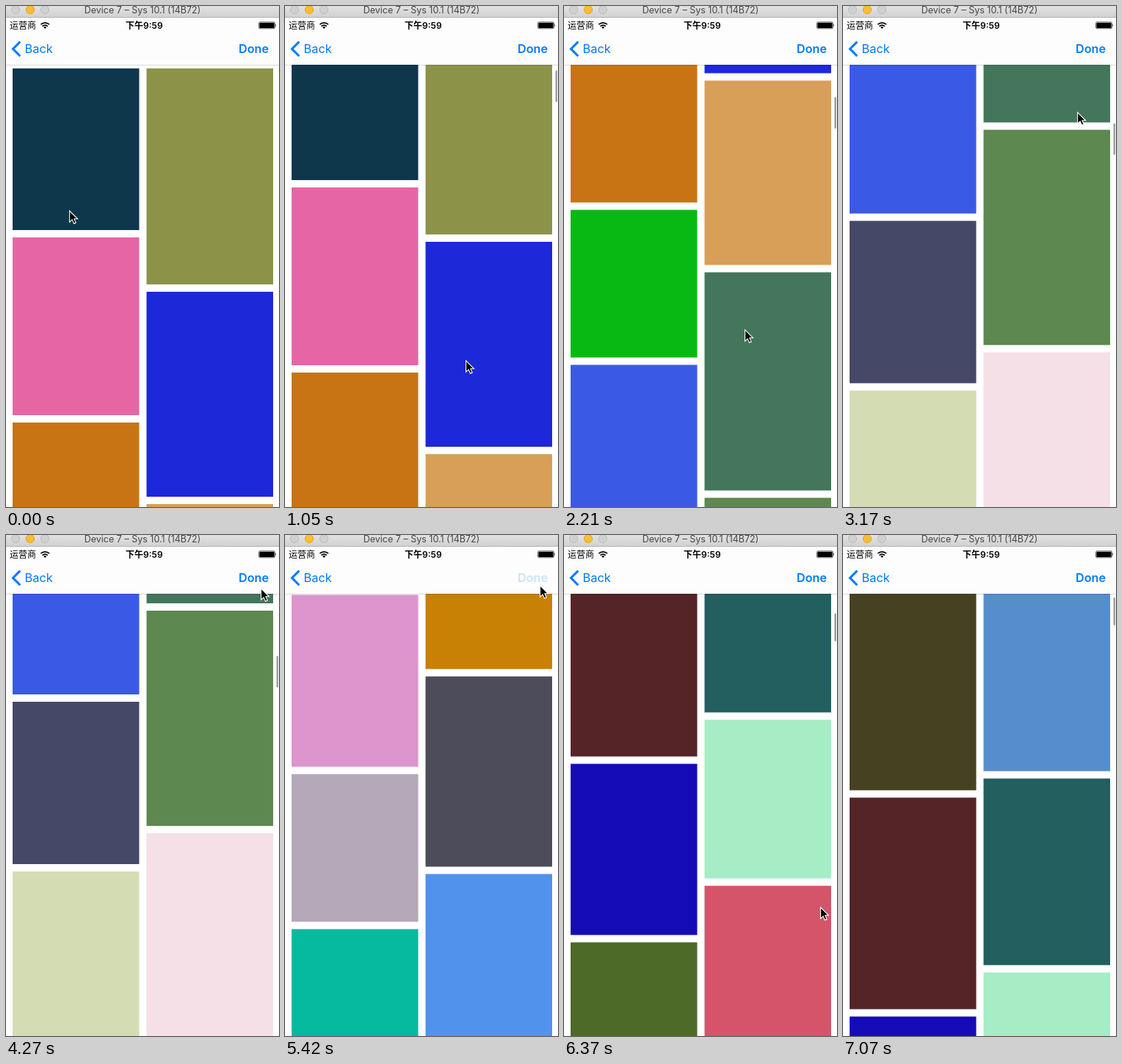
Animation, 372 px wide and 682 px high, one loop 7.17 s. Source, as an HTML page:

```html
<!DOCTYPE html>
<html lang="zh">
<head>
<meta charset="utf-8">
<style>
  html, body { margin: 0; width: 372px; height: 682px; overflow: hidden; background: #fff; }
  svg { display: block; }
  text { font-family: Inter, "Noto Sans CJK SC", "Noto Sans CJK", sans-serif; }
</style>
</head>
<body>
<svg width="372" height="682" viewBox="0 0 372 682">
  <defs>
    <linearGradient id="titleBar" x2="0" y2="1">
      <stop stop-color="#e2e2e2"/><stop offset="1" stop-color="#d1d1d1"/>
    </linearGradient>
    <clipPath id="view"><rect y="80" width="372" height="602"/></clipPath>
  </defs>

  <g clip-path="url(#view)"><g id="tiles"></g></g>
  <rect id="indicator" x="368.5" width="2.5" rx="1.25" fill="#000" fill-opacity=".38"/>

  <rect y="16" width="372" height="64" fill="#fdfdfd"/>
  <rect y="80" width="372" height=".5" fill="#000" fill-opacity=".3"/>
  <rect width="372" height="15" fill="url(#titleBar)"/>
  <rect y="15" width="372" height="1" fill="#b4b4b4"/>
  <g fill="#d0d0d0" stroke="#bcbcbc">
    <circle cx="13" cy="5" r="5.6"/>
    <circle cx="33" cy="5" r="5.6" fill="#fdbe2f" stroke="#e3a22a"/>
    <circle cx="53" cy="5" r="5.6"/>
  </g>
  <text x="186" y="9.8" font-size="12.5" fill="#454545" text-anchor="middle">Device 7 – Sys 10.1 (14B72)</text>

  <text x="5" y="30.5" font-size="12">运营商</text>
  <g fill="none" stroke="#000" stroke-width="1.7">
    <path d="M47.4 25.2a8.2 8.2 0 0 1 11.6 0M49.6 27.6a5 5 0 0 1 7.2 0"/>
    <path d="M53.2 31l-2-2.1a2.9 2.9 0 0 1 4 0z" fill="#000" stroke="none"/>
  </g>
  <text x="188.3" y="30.5" font-size="12" font-weight="600" text-anchor="middle">下午9:59</text>
  <rect x="344.5" y="21.8" width="22" height="9" rx="1.8" fill="none" stroke="#000" stroke-width=".6"/>
  <rect x="345.4" y="22.7" width="20.2" height="7.2" rx="1"/>
  <path d="M367.4 24.6q1.4 1.7 0 3.4z"/>

  <g fill="#007aff">
    <path d="M19.3 48.6L9.5 58.4L19.3 68.2" fill="none" stroke="#007aff" stroke-width="3"/>
    <text x="25.5" y="64" font-size="16.4">Back</text>
    <text id="done" x="358" y="64" font-size="16.2" font-weight="600" text-anchor="end">Done</text>
  </g>
  <path id="cursor" d="M.6 .8V16.2L4.1 12.9L6.5 18.3L9.2 17.1L6.9 11.8H11.6Z" stroke="#fff" stroke-width="1.1"/>
</svg>

<script>
const LOOP = 7170, TOP = 85, GAP = 10, COLUMN_X = [9, 191.5], COLUMN_W = 172.5, VIEW_H = 603;

// Each list: time it appears, content height, two columns of [colour, height].
const lists = [
  { from: 0, total: 8456, columns: [
    [["#0f374c", 220], ["#e666a5", 242], ["#c87414", 277], ["#08b914", 201], ["#3a5ae6", 295], ["#464868", 221], ["#d4dcb4", 260]],
    [["#8c9349", 294], ["#1d28d8", 279], ["#d79f58", 251], ["#44765c", 297], ["#5d884f", 293], ["#f5e0e7", 300]]] },
  { from: 4630, total: 9000, columns: [
    [["#9c7f5a", 1210], ["#4a8f9c", 240], ["#a65f86", 290]],
    [["#6d8fc0", 1330], ["#8f9a60", 250], ["#7b6aa8", 260]]] },
  { from: 5420, total: 9568, columns: [
    [["#464221", 296], ["#552427", 288], ["#150cb8", 233], ["#4d6a29", 289], ["#dd95cd", 234], ["#b5a8b9", 201], ["#05ba9f", 260]],
    [["#568ecc", 270], ["#225f5e", 254], ["#a6ecc4", 216], ["#d5546a", 230], ["#c88005", 237], ["#4d4c5b", 259], ["#5092ec", 290]]] }
];

const cadence = [[0, 1], [60, 3], [270, 1], [450, 11], [1130, 1], [1220, 5], [1590, 4], [1950, 3],
  [2210, 6], [2730, 5], [3170, 4], [3500, 9], [4270, 5], [4630, 1], [4770, 4], [5000, 1], [5300, 1],
  [5420, 1], [5560, 9], [6190, 1], [6280, 1], [6370, 8], [7070, 1], [LOOP, 1]];

// Tracks: [time, value, ...], linear between keys.
const scrollTrack = [[860, 0], [1130, 125], [1590, 340.5], [1900, 494], [2210, 576.5], [2620, 917],
  [2870, 1015], [3170, 1077.5], [3600, 1119], [4100, 1140], [4630, 1149.5], [5540, 1149.5],
  [5900, 840], [6370, 377.5], [6700, 157], [7070, 33.5]];
const cursorTrack = [[0, 86, 278], [270, 154, 309], [440, 154, 309], [860, 246, 550], [1590, 246, 210],
  [1750, 246, 190], [2120, 246, 500], [2210, 246, 440], [2620, 262, 130], [3000, 300, 155],
  [3170, 319, 144], [3410, 335, 79], [4210, 347, 73], [4420, 347, 68], [5530, 347, 68],
  [5650, 348, 105], [6370, 349, 506], [6680, 349, 700]];
const doneTrack = [[4480, 1], [4481, .2], [4710, .2], [5000, 1], [5299, 1], [5300, .2], [5490, .2], [5800, 1]];
const indicatorTrack = [[870, 0], [880, 1], [4480, 1], [4630, 0], [5550, 0], [5560, 1]];

const $ = id => document.getElementById(id);

function sample(track, t) {
  const next = track.findIndex(key => key[0] > t);
  if (next === 0) return track[0].slice(1);
  if (next < 0) return track.at(-1).slice(1);
  const a = track[next - 1], b = track[next], k = (t - a[0]) / (b[0] - a[0]);
  return a.slice(1).map((v, i) => v + (b[i + 1] - v) * k);
}

function snap(t) {
  const i = cadence.findLastIndex(c => c[0] <= t);
  const [start, count] = cadence[i];
  const step = (cadence[i + 1][0] - start) / count;
  return start + Math.floor((t - start) / step + 1e-6) * step;
}

function drawTiles(list) {
  $("tiles").innerHTML = list.columns.map((column, i) => {
    let y = TOP;
    return column.map(([fill, h]) => {
      const rect = `<rect x="${COLUMN_X[i]}" y="${y}" width="${COLUMN_W}" height="${h}" fill="${fill}"/>`;
      y += h + GAP;
      return rect;
    }).join("");
  }).join("");
}

let shown;
function render(now) {
  const t = snap(now % LOOP);
  const list = lists.findLast(l => l.from <= t);
  if (list !== shown) drawTiles(shown = list);

  const scroll = Math.round(sample(scrollTrack, t)[0] * 2) / 2;
  $("tiles").setAttribute("transform", `translate(0 ${-scroll})`);

  const ratio = VIEW_H / list.total;
  $("indicator").setAttribute("y", 83 + scroll * ratio);
  $("indicator").setAttribute("height", VIEW_H * ratio);
  $("indicator").setAttribute("opacity", sample(indicatorTrack, t)[0]);

  $("done").setAttribute("opacity", sample(doneTrack, t)[0]);
  const [x, y] = sample(cursorTrack, t).map(Math.round);
  $("cursor").setAttribute("transform", `translate(${x} ${y})`);
}

const begin = performance.now();
function tick() {
  render(performance.now() - begin);
  requestAnimationFrame(tick);
}
tick();
</script>
</body>
</html>
```
